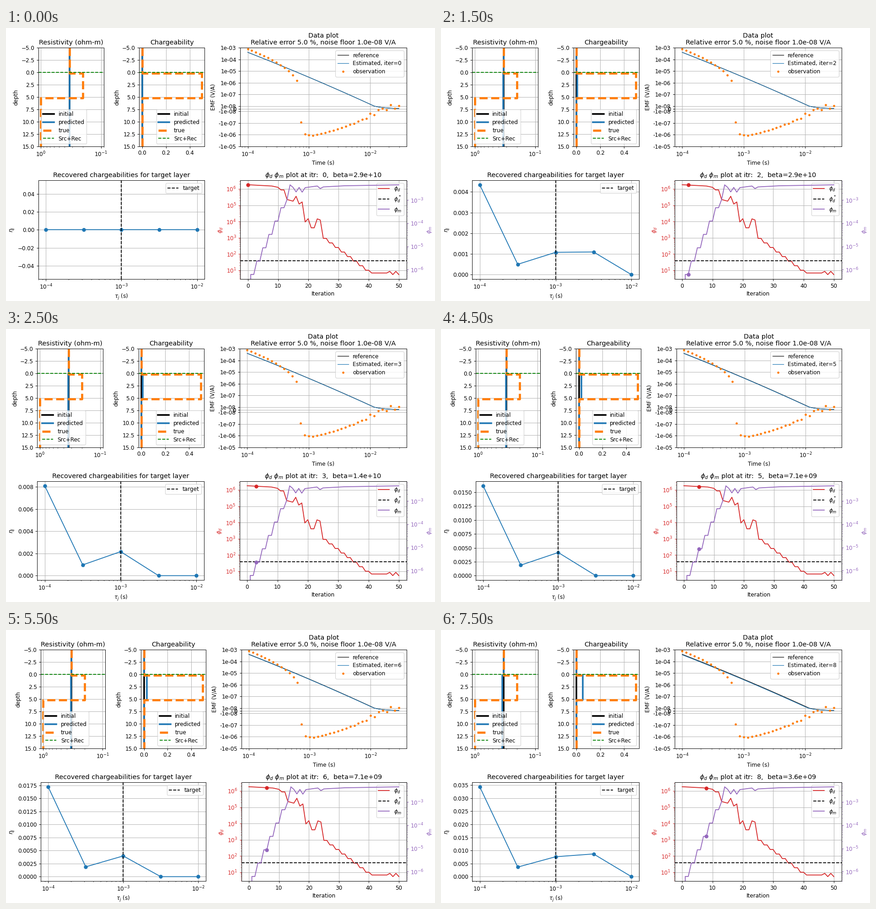
Recreate the animation shown at these times as a matplotlib script. Size 938 by 597 pixels, loop 8000 ms.

```python
import numpy as np
import matplotlib.pyplot as plt
from matplotlib.animation import FuncAnimation

W, H, DPI = 938, 597, 86.4
BLUE, ORANGE, RED, PURPLE = "tab:blue", "tab:orange", "tab:red", "tab:purple"
TOP, BOTTOM = (43.2, 259.0), (333.4, 549.2)   # pixel rows of the two panel bands
RIGHT, GAP = 875.5, 77.8
STEP_DEPTH = [-5, 0.2, 0.2, 5.2, 5.2, 15]

plt.rcParams.update({"legend.labelspacing": 0.4, "legend.borderpad": 0.37})


def spectrum(k):
    """Chargeabilities at five time constants; they double every second iteration."""
    if k == 0:
        return np.zeros(5)
    n, second = divmod(k - 1, 2)
    shape = np.array([1, 0.123 - 0.003 * n, 0.278 - 0.01 * n, 0, 0])
    if second:
        shape *= [1.067, 1, 0.955, 1, 1]
        if n % 3 == 0:
            shape[3] = 0.27
    return 0.00406 * 1.993 ** n * shape


def observed(i):
    """Decay, minus a slower polarization decay, plus a ripple at the noise floor."""
    decay = 10 ** (5.187 - 0.12 * i - 0.00472 * i ** 2)
    polarization = 10 ** (4.4 - 0.12 * i)
    noise = 2.4 + 1.3 * np.cos(2 * np.pi * (i - 30) / 2.5)
    return 6e-9 * (decay - polarization + noise)


def through(k, points):
    x, y = zip(*points)
    return np.interp(k, x, y)


def misfit(k):
    start = through(k, [(0, 6.26), (8, 6.18), (10, 6.10), (11, 5.94), (12, 5.94),
                        (13, 5.35), (15, 5.25), (16, 5.55), (17, 5.07), (18, 5.20),
                        (19, 3.97), (20, 4.17), (21, 3.61), (22, 3.61), (23, 4.16),
                        (24, 4.09)])
    stairs = 2.96 - 0.28 * ((k - 25) // 2)
    floor = 0.83 - 0.1 * (k > 46) * np.cos(np.pi * k)
    return 10 ** np.where(k < 25, start, np.maximum(stairs, floor))


def model_norm(k):
    stairs = -6.21 + 0.575 * ((k - 1) // 2)
    settle = through(k, [(13, -2.98), (14, -2.35), (15, -2.46), (16, -2.655),
                         (17, -2.46), (18, -2.665), (19, -2.47), (23, -2.40),
                         (24, -2.51), (25, -2.44), (32, -2.39), (50, -2.35)])
    return np.where(k == 0, 0, 10 ** np.where(k < 13, stairs, settle))


def steps(above, layer, below):
    return [above, above, layer, layer, below, below]


def place(ax, left, right, band):
    top, bottom = band
    ax.set_position([left / W, 1 - bottom / H, (right - left) / W, (bottom - top) / H])


def layout(left):
    w = (RIGHT - left - 3 * GAP) / 4
    col = [left + i * (w + GAP) for i in range(4)]
    place(ax_rho, col[0], col[0] + w, TOP)
    place(ax_chg, col[1], col[1] + w, TOP)
    place(ax_emf, col[2], RIGHT, TOP)
    place(ax_eta, col[0], col[1] + w, BOTTOM)
    place(ax_phi, col[2], RIGHT, BOTTOM)
    place(ax_norm, col[2], RIGHT, BOTTOM)


def depth_panel(ax, title, initial, true, loc):
    ax.plot(initial, STEP_DEPTH, "k", lw=3, label="initial")
    predicted, = ax.plot(initial, STEP_DEPTH, color=BLUE, lw=3, label="predicted")
    ax.plot(true, STEP_DEPTH, "--", color=ORANGE, lw=4, label="true")
    ax.axhline(0, color="g", ls="--", lw=1.5, label="Src+Rec")
    ax.set_ylim(15, -5)
    ax.set_yticks(np.arange(-5, 15.1, 2.5))
    ax.set_ylabel("depth")
    ax.set_title(title)
    ax.grid(True)
    ax.legend(loc=loc)
    return predicted


fig = plt.figure(figsize=((W + 0.01) / DPI, (H + 0.01) / DPI), dpi=DPI, facecolor="white")
ax_rho, ax_chg, ax_emf, ax_eta, ax_phi = [
    fig.add_axes([0.1, 0.1, 0.2, 0.2], label=name)
    for name in ("rho", "charge", "emf", "eta", "phi")]
ax_norm = ax_phi.twinx()

# Layered models
ax_rho.set_xscale("log")
rho_line = depth_panel(ax_rho, "Resistivity (ohm-m)", steps(1 / 3, 1 / 3, 1 / 3),
                       steps(1 / 3, 0.2, 1), "lower left")
ax_rho.set_xlim(1.1, 0.09)
chg_line = depth_panel(ax_chg, "Chargeability", steps(0, 0, 0),
                       steps(0, 0.5, 0), "lower right")
ax_chg.set_xlim(-0.025, 0.525)
ax_chg.set_xticks([0, 0.2, 0.4])

# Decay curves
samples = np.arange(38)
decades = samples / 15
times = 10 ** (decades - 4)
reference = 10 ** (-3.39 - 2.052 * decades - 0.086 * decades ** 2)
ax_emf.set_xscale("log")
ax_emf.set_yscale("symlog", linthresh=1e-8, linscale=0.2)
ax_emf.plot(times, reference, "k", lw=1, label="reference")
emf_line, = ax_emf.plot(times, reference, color=BLUE, lw=1, label="Estimated, iter=0")
ax_emf.plot(times, observed(samples), ".", color=ORANGE, ms=6, label="observation")
ax_emf.set_ylim(-1e-5, 1e-3)
ticks = [-10.0 ** p for p in range(-5, -9, -1)] + [0] + [10.0 ** p for p in range(-8, -2)]
ax_emf.set_yticks(ticks)
ax_emf.set_yticklabels([f"{v:.0e}" if v else "0" for v in ticks])
ax_emf.set_xlim(10 ** (-4 - 0.05 * decades[-1]), 10 ** (-4 + 1.05 * decades[-1]))
ax_emf.set_xlabel("Time (s)")
ax_emf.set_ylabel("EMF (V/A)")
ax_emf.set_title("Data plot\nRelative error 5.0 %, noise floor 1.0e-08 V/A",
                 linespacing=1.1)
ax_emf.grid(True)
emf_legend = ax_emf.legend(loc="upper right")

# Chargeability spectrum
ax_eta.set_xscale("log")
eta_line, = ax_eta.plot(np.logspace(-4, -2, 5), spectrum(0), "o-", color=BLUE)
target = ax_eta.axvline(1e-3, color="k", ls="--")
ax_eta.set_xlim(10 ** -4.1, 10 ** -1.9)
ax_eta.set_xlabel(r"$\tau_j$ (s)")
ax_eta.set_ylabel(r"$\eta_j$")
ax_eta.set_title("Recovered chargeabilities for target layer")
ax_eta.grid(True)
ax_eta.legend([target], ["target"], loc="upper right")

# Convergence
iters = np.arange(51)
phi_d, phi_m = misfit(iters), model_norm(iters)
d_line, = ax_phi.semilogy(iters, phi_d, color=RED)
goal = ax_phi.axhline(38.4, color="k", ls="--")
m_line, = ax_norm.semilogy(iters, phi_m, color=PURPLE)
d_dot, = ax_phi.plot([0], [1], "o", color=RED)
m_dot, = ax_norm.plot([0], [1], "o", color=PURPLE)
ax_phi.set_xlim(-2.5, 52.5)
ax_phi.set_ylim(10 ** 0.4515, 10 ** 6.523)
ax_norm.set_ylim(10 ** -6.411, 10 ** -2.161)
ax_phi.set_xlabel("Iteration")
ax_phi.set_ylabel(r"$\phi_d$", color=RED)
ax_norm.set_ylabel(r"$\phi_m$", color=PURPLE)
ax_phi.tick_params(axis="y", which="both", colors=RED)
ax_norm.tick_params(axis="y", which="both", colors=PURPLE)
ax_phi.grid(True)
ax_phi.legend([d_line, goal, m_line], [r"$\phi_d$", r"$\phi_d^*$", r"$\phi_m$"],
              loc="upper right")


def left_edge(peak):
    # wider tick labels push the panels to the right
    if peak == 0:
        return 70.7
    return 75.9 if 0.01 < peak < 0.02 else 68.3


def update(frame):
    k = (frame + 1) // 2
    eta = spectrum(k)
    total, peak = eta.sum(), eta.max()
    layout(left_edge(peak))

    rho = 10 ** (0.43 * total) / 3
    rho_line.set_xdata(steps(1 / 3, rho, rho))
    chg_line.set_xdata(steps(0, total, 0))

    emf_line.set_ydata(reference * 10 ** (-0.9 * total))
    emf_legend.get_texts()[1].set_text(f"Estimated, iter={k}")

    eta_line.set_ydata(eta)
    if peak:
        ax_eta.set_ylim(-0.05 * peak, 1.05 * peak)
    else:
        ax_eta.set_ylim(-0.055, 0.055)

    d_dot.set_data([k], [phi_d[k]])
    m_dot.set_data([k], [phi_m[k]])
    beta = 2.852e10 / 2 ** (max(k - 1, 0) // 2)
    ax_phi.set_title(rf"$\phi_d$ $\phi_m$ plot at itr:  {k},  beta={beta:.1e}")
    return []


anim = FuncAnimation(fig, update, frames=16, init_func=lambda: update(0),
                     interval=500, repeat=True, repeat_delay=0, blit=False)
plt.show()
```
